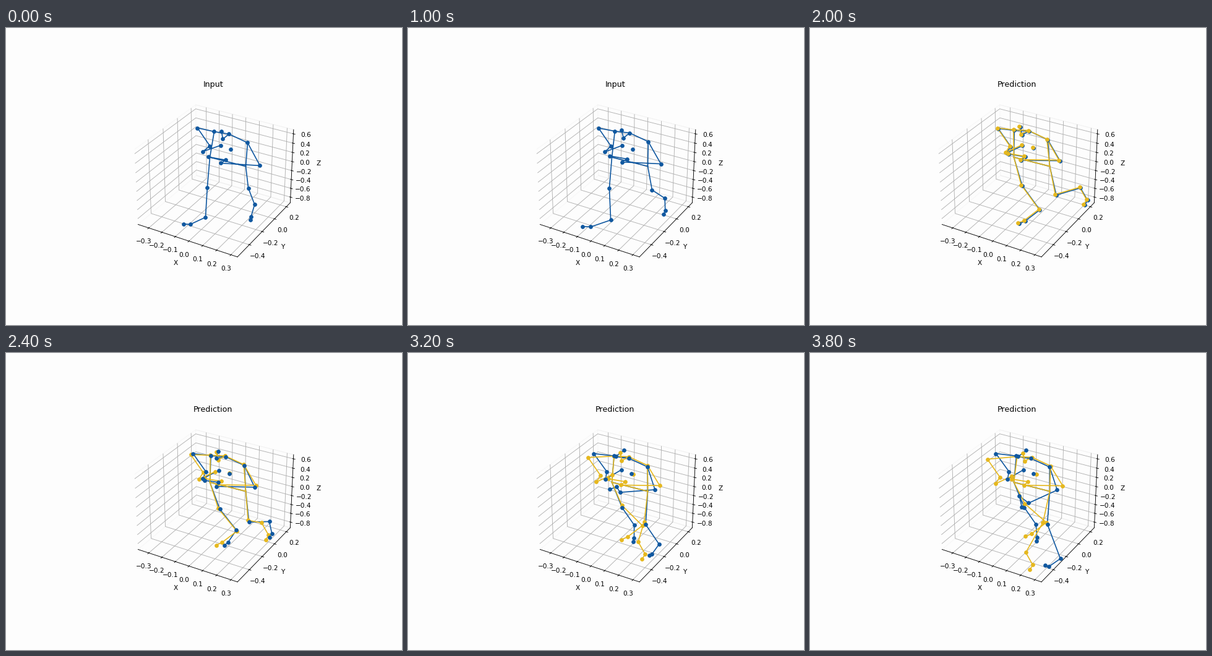
A matplotlib script for the animation above (4 s loop, 640 by 480 pixels).

```python
import numpy as np
import matplotlib.pyplot as plt
from matplotlib.animation import FuncAnimation

plt.rcParams.update({"font.size": 9.5, "axes.labelpad": 2.9,
                     "xtick.major.pad": 3, "ytick.major.pad": 3})

W, H, DPI = 640, 480, 80
FRAMES, SPLIT = 20, 10          # input steps first, then prediction
BLUE, GOLD, PAPER = "#1058a0", "#e6b81e", "#fdfdfd"

CHAINS = [
    "r_toe r_heel r_ankle r_knee r_hip r_shoulder neck "
    "l_shoulder l_hip l_knee l_ankle l_heel l_toe",
    "r_hip l_hip",
    "r_shoulder r_elbow r_wrist r_hand r_finger",
    "l_shoulder l_elbow l_wrist l_hand l_finger",
    "neck head crown",
]


# Clocks: how far each kind of movement has gone at step t.
def stride(t):
    return np.exp(-((t - 9.2) / 4.2) ** 2)


def turn(t):
    s = np.clip((t - 8) / 8, 0, 1)
    return s * s * (3 - 2 * s)


def late(t, power=1.5):
    return np.clip((t - SPLIT) / (FRAMES - 1 - SPLIT), 0, 1) ** power


def drop(t):
    return late(t, 3)


def swing(t):
    kick = 0.24 * np.clip(1 - t / 3, 0, 1) ** 2
    return kick + 1 / (1 + np.exp((8 - t) / 2.25))


def joint(x, y, reach, *moves):
    """Path of a joint: base point, shift at mid-stride, then (dx, dy, clock)."""
    def at(t):
        spot = np.array([x, y]) + np.array(reach) * stride(t)
        for dx, dy, clock in moves:
            spot = spot + np.array([dx, dy]) * clock(t)
        return spot
    return at


SWAY, R_SWAY, L_SWAY = (-6, -5), (-4, 1), (-5, -5)
LEAN = (-3, -1, turn)

TRUTH = {
    "r_shoulder": joint(337, 168, (-6, -2), LEAN),
    "neck": joint(361, 172, SWAY, LEAN),
    "l_shoulder": joint(391, 186, SWAY, LEAN),
    "head": joint(351, 180, SWAY, (-14, -12, turn)),
    "crown": joint(349, 168, (-9, -6), (1, -10, turn)),
    "spine": joint(364, 197, (-2, -2), (-2, -1, turn)),

    "r_elbow": joint(310, 162, R_SWAY, (-9, 1, turn)),
    "r_wrist": joint(330, 191, R_SWAY, (-8, 1, turn)),
    "r_hand": joint(319, 200, (-1, 2), (1, 4, turn)),
    "r_finger": joint(348, 190, R_SWAY, (-2, -1, turn)),

    "l_elbow": joint(411, 223, (-5, -8), (-11, -1, turn)),
    "l_wrist": joint(348, 219, L_SWAY, (-9, 0, turn), (15, 24, drop)),
    "l_hand": joint(356, 214, L_SWAY, (-18, -3, turn), (1, 21, drop)),
    "l_finger": joint(328, 209, L_SWAY, (-8, 0, turn), (23, 41, drop)),

    "r_knee": joint(318, 261, (5, 2), (29, -11, swing)),
    "r_ankle": joint(307, 317, (24, 6), (59, -40, swing)),
    "r_heel": joint(273, 325, (8, 7), (95, -27, swing)),
    "r_toe": joint(259, 322, (3, 8), (108, -18, swing)),

    "l_knee": joint(392, 259, (8, 9), (-8, 18, turn)),
    "l_ankle": joint(402, 286, (37, -28), (3, 47, late)),
    "l_heel": joint(396, 306, (55, -28), (-10, 40, late)),
    "l_toe": joint(395, 311, (51, -25), (-15, 33, late)),
}
HIPS = {"r_hip": (330, 209.5), "l_hip": (388, 224)}

# The prediction leaves the true pose and each limb drifts its own way.
DRIFT = {"r_knee": (6, -10), "l_knee": (-20, 5)}
for limb, shift in {
    "r_shoulder neck l_shoulder head crown spine": (6, 3),
    "r_elbow r_wrist r_hand r_finger": (-16, 10),
    "l_elbow l_wrist l_hand l_finger": (6, 1),
    "r_ankle r_heel r_toe": (12, -19),
    "l_ankle l_heel l_toe": (-87, 65),
}.items():
    DRIFT.update(dict.fromkeys(limb.split(), shift))


def true_pose(t):
    return {name: at(t) for name, at in TRUTH.items()}


def guess_pose(t):
    ease = 1 - (1 - late(t, 1)) ** 1.2
    return {name: spot + (-1.5, -1) + np.array(DRIFT[name]) * ease
            for name, spot in true_pose(SPLIT).items()}


fig = plt.figure(figsize=(W / DPI, H / DPI), dpi=DPI, facecolor=PAPER)

side, left, bottom = 286, 191.8, 92
ax = fig.add_axes([left / W, bottom / H, side / W, side / H],
                  projection="3d", facecolor="none")
ax.set(xlim=(-0.382, 0.3455), ylim=(-0.577, 0.268), zlim=(-0.929, 0.689),
       xlabel="X", ylabel="Y", zlabel="Z")
ax.set_xticks(np.arange(-3, 4) / 10)
ax.set_yticks(np.arange(-2, 2) / 5)
ax.set_zticks(np.arange(-4, 4) / 5)
for axis in (ax.xaxis, ax.yaxis, ax.zaxis):
    axis.pane.fill = False
title = ax.set_title("Input")

stage = fig.add_axes([0, 0, 1, 1])
stage.set(xlim=(0.5, W + 0.5), ylim=(H + 0.5, 0.5))
stage.axis("off")


class Skeleton:
    def __init__(self, color, z):
        self.bones, = stage.plot([], [], color=color, lw=1.5, zorder=z)
        self.joints, = stage.plot([], [], "o", color=color, ms=5, zorder=z + 2)

    def pose(self, spots):
        self.joints.set_data(*np.transpose(list(spots.values())))
        spots = spots | HIPS
        line = []
        for chain in CHAINS:
            line += [spots[name] for name in chain.split()] + [(np.nan, np.nan)]
        self.bones.set_data(*np.transpose(line))

    def show(self, on):
        self.bones.set_visible(on)
        self.joints.set_visible(on)


real = Skeleton(BLUE, 3)
pred = Skeleton(GOLD, 4)


def draw(i):
    predicting = i >= SPLIT
    title.set_text("Prediction" if predicting else "Input")
    real.pose(true_pose(i))
    # The true joints come to the front once the poses part.
    real.joints.set_zorder(7 if i >= SPLIT + 2 else 5)
    pred.pose(guess_pose(i))
    pred.show(predicting)
    return title, real.bones, real.joints, pred.bones, pred.joints


anim = FuncAnimation(fig, draw, frames=FRAMES, interval=200,
                     repeat=True, repeat_delay=0, blit=False)
plt.show()
```
